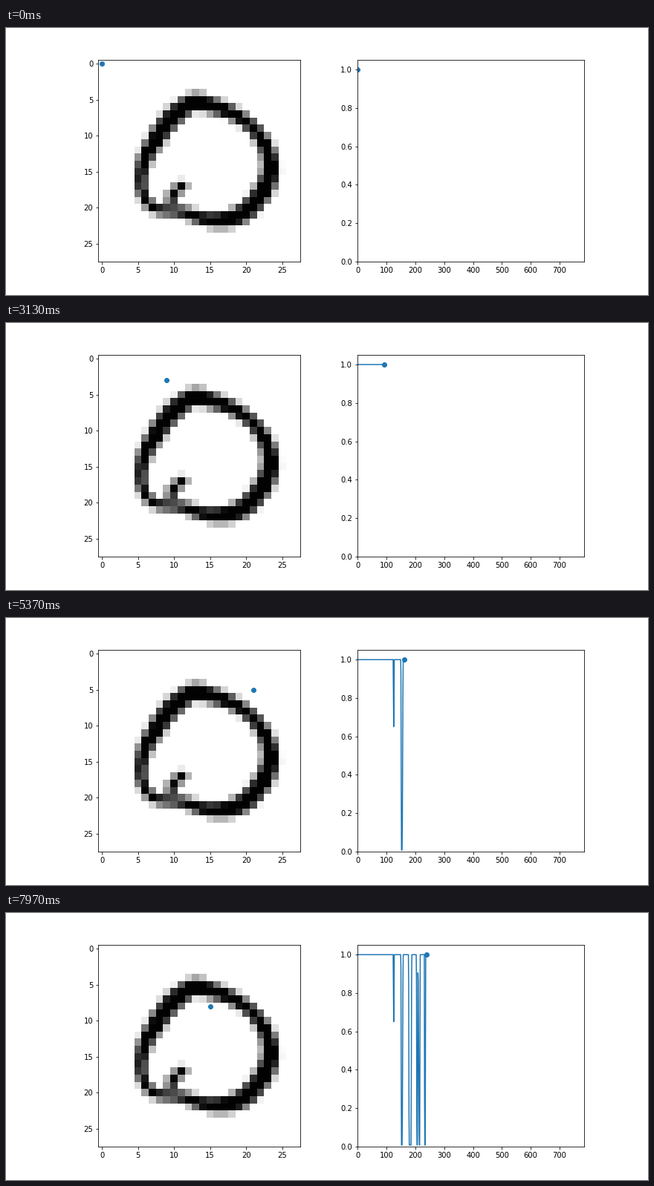
Write a matplotlib script that moves like this. It is 864 px wide and 360 px high and loops after 8 s.

```python
import numpy as np
import matplotlib.pyplot as plt
from matplotlib.animation import FuncAnimation

plt.rcParams.update({"font.family": "DejaVu Sans", "font.size": 10})

SIZE = 28
FRAMES = 240
BLUE = "#1f77b4"

# Key points of the handwritten zero: a closed loop and a short inner hook
LOOP = np.array([(15, 21.7), (18.8, 21.2), (21.6, 18.8), (23.3, 15.3),
                 (22.9, 12), (21, 9), (18.2, 7), (15, 5.75), (12.5, 5.45),
                 (9.7, 7.6), (7.6, 10.4), (5.8, 13.8), (5.5, 17.3),
                 (7.2, 20), (11, 20.6)])
HOOK = np.array([(11.2, 17), (9.8, 18), (9.6, 19.6)])


def smooth_loop(points, steps=20):
    """Closed Catmull-Rom curve through the points."""
    a, b, c, d = (np.roll(points, k, axis=0)[:, None] for k in (1, 0, -1, -2))
    t = np.linspace(0, 1, steps, endpoint=False)[:, None]
    curve = (2 * b + (c - a) * t + (2 * a - 5 * b + 4 * c - d) * t**2
             + (3 * b - a - 3 * c + d) * t**3) / 2
    return curve.reshape(-1, 2)


def polyline(points, steps=40):
    t = np.linspace(0, len(points) - 1, steps)
    return np.column_stack([np.interp(t, np.arange(len(points)), axis)
                            for axis in points.T])


def nib(curve):
    """Half width of the slanted pen, by direction from the centre."""
    angle = np.arctan2(curve[:, 1] - 13.5, curve[:, 0] - 14.5)
    return 1.03 + 0.26 * np.sin(2 * angle) + 0.12 * np.cos(angle + np.pi / 4)


def stroke(curve, radius):
    y, x = np.mgrid[:SIZE, :SIZE, :1][:2]
    dist = np.hypot(x - curve[:, 0], y - curve[:, 1])
    return np.clip((radius - dist).max(axis=2) + 0.5, 0, 1)


loop = smooth_loop(LOOP)
ink = np.maximum(stroke(loop, nib(loop)), stroke(polyline(HOOK), 0.6))
digit = 1 - 0.992 * ink
values = digit.ravel()

fig, (left, right) = plt.subplots(1, 2, figsize=(12, 5), dpi=72)
fig.subplots_adjust(left=0.125, right=0.9, bottom=0.125, top=0.88, wspace=0.2)

left.imshow(digit, cmap="gray", vmin=0, vmax=1, interpolation="nearest")
scan, = left.plot([], [], "o", color=BLUE)

right.set_xlim(0, SIZE * SIZE)
right.set_ylim(0, 1.05)
trace, = right.plot([], [], color=BLUE)
head, = right.plot([], [], "o", color=BLUE)


def update(i):
    row, col = divmod(i, SIZE)
    scan.set_data([col], [row])
    trace.set_data(np.arange(i + 1), values[:i + 1])
    head.set_data([i], [values[i]])
    return scan, trace, head


anim = FuncAnimation(fig, update, frames=FRAMES, interval=8000 / FRAMES,
                     init_func=lambda: update(0), repeat=True, repeat_delay=0)
plt.show()
```
